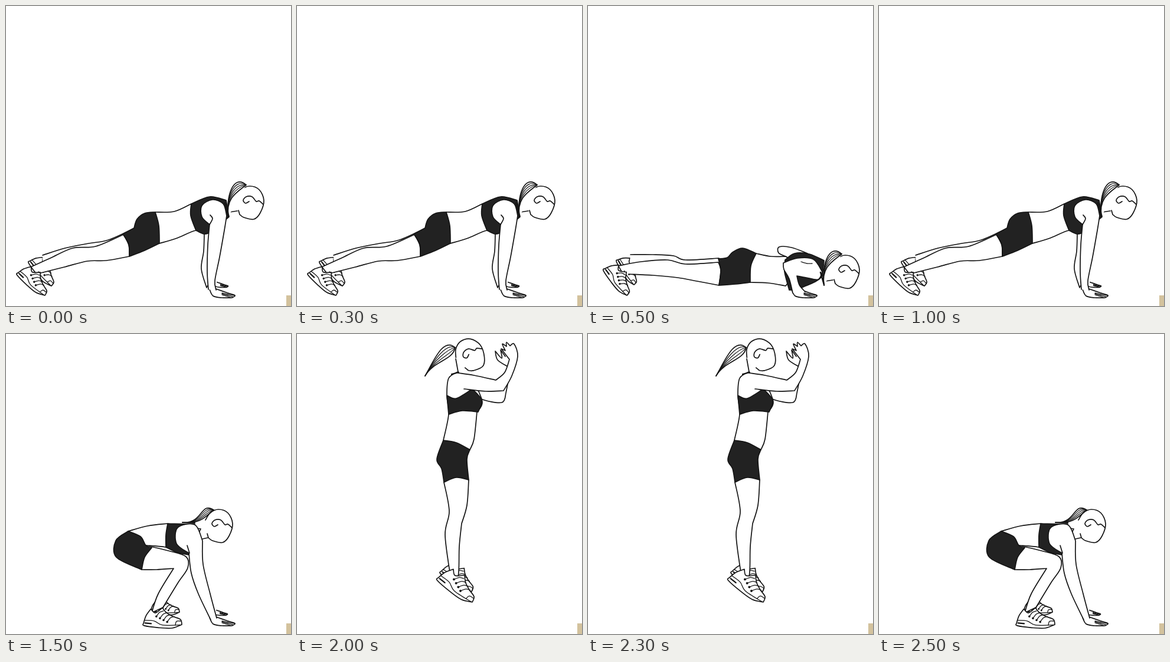
These frames come from a looping animation (483x508 px, 3 s). An HTML page with a canvas:

```html
<!DOCTYPE html>
<html lang="en">
<head>
<meta charset="utf-8">
<title>Burpee</title>
<style>
html, body { margin: 0; width: 100%; height: 100%; overflow: hidden; background: #fff; }
canvas { display: block; }
</style>
</head>
<body>
<canvas id="stage" width="483" height="508"></canvas>
<script>
const ctx = document.getElementById('stage').getContext('2d');
const INK = '#141414', CLOTH = '#222', SKIN = '#fff';
const STEP = 500;

// Smooth curve through "x,y" points; a slash makes a corner at the point before it.
function curve(text) {
  const path = new Path2D();
  let last = null;
  for (const part of text.split('/')) {
    const p = part.trim().split(/\s+/).map(s => s.split(',').map(Number));
    if (last) p.unshift(last);
    else path.moveTo(...p[0]);
    for (let i = 0; i < p.length - 1; i++) {
      const a = p[i - 1] || p[i], b = p[i], c = p[i + 1], d = p[i + 2] || c;
      path.bezierCurveTo(
        b[0] + (c[0] - a[0]) / 6, b[1] + (c[1] - a[1]) / 6,
        c[0] - (d[0] - b[0]) / 6, c[1] - (d[1] - b[1]) / 6, c[0], c[1]);
    }
    last = p[p.length - 1];
  }
  return path;
}

function paint(path, fill, width = 1.7) {
  if (fill) {
    ctx.fillStyle = fill;
    ctx.fill(path);
  }
  const { a, b } = ctx.getTransform();
  ctx.lineWidth = width / Math.hypot(a, b);
  ctx.stroke(path);
}
const skin = text => paint(curve(text), SKIN);
const cloth = text => paint(curve(text), CLOTH);
const line = (text, width) => paint(curve(text), null, width);

function placed(x, y, angle, scale, draw) {
  ctx.save();
  ctx.translate(x, y);
  ctx.rotate(angle);
  ctx.scale(scale, scale);
  draw();
  ctx.restore();
}

// The sole runs from heel to toe along one unit of length.
function shoe(heelX, heelY, toeX, toeY) {
  const dx = toeX - heelX, dy = toeY - heelY;
  placed(heelX, heelY, Math.atan2(dy, dx), Math.hypot(dx, dy), () => {
    skin('0,0 .06,-.2 .18,-.38/.3,-.28 .48,-.42/.6,-.29 .77,-.2 .96,-.13 1,0/.75,.1 .4,.1 .02,.06 0,0');
    line('.03,-.08 .28,-.07 .5,.03 .97,.01', 1.3);
    line('.04,-.01 .2,0', 2.2);
    line('.83,.02 .86,-.08 .97,-.09', 1.3);
    for (let i = 0; i < 4; i++) {
      const x = .33 + i * .095, y = -.19 + i * .045;
      line(`${x},${y} ${x + .08},${y - .11} ${x + .18},${y - .15}`, 1.3);
      const eyelet = new Path2D();
      eyelet.arc(x, y, .02, 0, 7);
      paint(eyelet, INK, 1);
    }
  });
}

// Palm on the floor, origin at the wrist.
function hand(x, y, scale = 1) {
  placed(x, y, 0, scale, () => {
    skin('-1,-3 5,8 20,11 37,11/42,7 30,3 10,-4');
    for (let i = 0; i < 3; i++) line(`20,${3 + i * 1.5} 30,${5 + i * 2} ${41 - i * 3},${7 + i * 2}`, 1.3);
  });
}

function head(x, y, tilt = 0) {
  placed(x, y, tilt, 1, () => {
    skin('-22,-8 -14,-20 0,-26 16,-20 24,-2 18,19 7,30 -10,27 -17,22/-19,15');
    line('23,5 16,-1 11,0 4,-8 -6,-8 -11,-2 -7,3 -1,0');
  });
}

// Strands fan out between two bends, then gather at the tip.
function ponytail(root, outer, inner, gather, tip) {
  const count = 4;
  const strand = (path, f) => path.bezierCurveTo(
    outer[0] + (inner[0] - outer[0]) * f, outer[1] + (inner[1] - outer[1]) * f, ...gather, ...tip);
  const tail = new Path2D();
  for (const f of [0, 1]) {
    tail.moveTo(...root);
    strand(tail, f);
  }
  paint(tail, SKIN);
  for (let i = 1; i < count; i++) {
    const hair = new Path2D();
    hair.moveTo(...root);
    strand(hair, i / count);
    paint(hair, null, 1.2);
  }
}

function hangingHead(x, y) {
  head(x, y);
  placed(x, y, 0, 1, () => {
    line('-34,18 -21,16');
    ponytail([-6, -28], [-28, -48], [-21, -16], [-41, -6], [-36, 25]);
    line('-42,3 -36,24', 2.4);
  });
}

function plank() {
  shoe(40, 432, 77, 474);
  skin('62,422 100,410 140,402 174,396 218,376/205,400 62,440');
  skin('44,441 75,427 113,410 152,407 199,387/208,405 209,424/170,431 138,432 99,442 59,452');
  shoe(20, 452, 66, 490);
  skin('253,349 285,348 314,335/345,383/322,380 290,393 260,402');
  cloth('253,349 235,351 222,361 217,376/198,386/208,403 209,424/235,414 260,402/259,372 253,349');
  hand(352, 470, .58);
  skin('336,385 335,415 331,445 340,477/356,440 357,385');
  cloth('314,335 345,323 373,329/378,357/345,384/335,386 322,380/313,355 314,335');
  hand(346, 483);
  skin('343,480 341,450 342,405 345,370/332,357 332,338 350,328 368,335 374,355/370,380 362,425 354,465 356,481');
  line('346,354 350,360 345,370');
  hangingHead(413, 331);
}

function low() {
  shoe(50, 430, 78, 472);
  skin('72,421 110,421 145,423 165,430 222,427/222,450 70,445');
  skin('51,440 90,433 135,430 165,437 221,434/225,448 222,473/185,466 152,460 110,456 70,454');
  shoe(28, 445, 66, 490);
  skin('335,424 323,418 324,408 345,409 372,419');
  skin('285,419 310,424 335,424/360,440/335,474/305,469 275,468');
  cloth('285,419 262,410 245,417 236,426 221,428/225,448 222,473/250,471 275,468/276,440 285,419');
  cloth('334,430 350,419 375,420 400,431/397,458/385,467 352,481/341,481/333,450 334,430');
  hand(346, 483);
  skin('347,486 341,462 332,446 331,435/355,427 382,429 397,450/390,463 370,460 354,457/358,472 368,484');
  line('361,433 371,436 380,436', 1.3);
  hangingHead(436, 448);
}

function squat() {
  shoe(245, 470, 294, 471);
  skin('207,334 240,325 274,321/330,330/311,371/271,361 237,358');
  skin('237,358 275,367 305,377 308,396 291,422 266,463/247,472/258,440 284,397/255,399 230,399');
  cloth('207,334 186,350 187,378 230,399/235,378 247,362/237,358 228,343 207,334');
  cloth('274,321 320,322/311,374/290,370 271,361/271,340 274,321');
  hand(351, 470, .58);
  hand(346, 483);
  skin('347,484 326,440 314,405 310,371/289,355 291,328 320,323 333,350/334,390 346,440 357,481');
  line('307,358 311,371');
  shoe(233, 490, 298, 492);
  head(360, 323);
  line('333,347 342,345');
  placed(360, 323, 0, 1, () => ponytail([-8, -25], [-30, -40], [-20, -17], [-27, -1], [-60, -4]));
  line('299,319 320,320', 2.2);
}

function jump() {
  shoe(244, 402, 296, 436);
  skin('304,97 312,110 347,116 354,100/358,80/315,90');
  skin('249,251 258,300 251,340 260,410/273,410 275,360 279,321/288,290 291,247');
  skin('273,64 257,75 254,104 257,136 248,180/293,196/300,178 305,132/314,115 300,80');
  cloth('248,180 270,184 293,196/288,212 291,247/270,243 249,251/245,228 237,212 248,180');
  cloth('254,104 270,109 297,93/313,112 307,132/280,130 257,136/254,104');
  skin('357,55 340,44 336,29/347,41 345,27/353,38');
  skin('273,66 300,70 337,78/352,65 360,43/346,25/353,28/348,17 355,21/355,14 361,20/368,17 374,38 364,71 350,96/320,97 283,93');
  line('262,68 274,65', 2.2);
  line('269,42 273,64');
  head(292, 34, -.6);
  ponytail([268, 23], [248, 5], [264, 45], [232, 45], [217, 71]);
  shoe(239, 413, 297, 454);
}

const poses = [plank, low, plank, squat, jump, squat];
let shown = -1;

function draw(index) {
  ctx.fillStyle = '#fff';
  ctx.fillRect(0, 0, 483, 508);
  ctx.fillStyle = '#d3c29d';
  ctx.fillRect(475, 490, 8, 18);
  ctx.strokeStyle = INK;
  ctx.lineCap = ctx.lineJoin = 'round';
  poses[index]();
}

function tick() {
  const index = Math.floor(performance.now() / STEP) % poses.length;
  if (index !== shown) draw(shown = index);
  requestAnimationFrame(tick);
}
tick();
</script>
</body>
</html>
```
